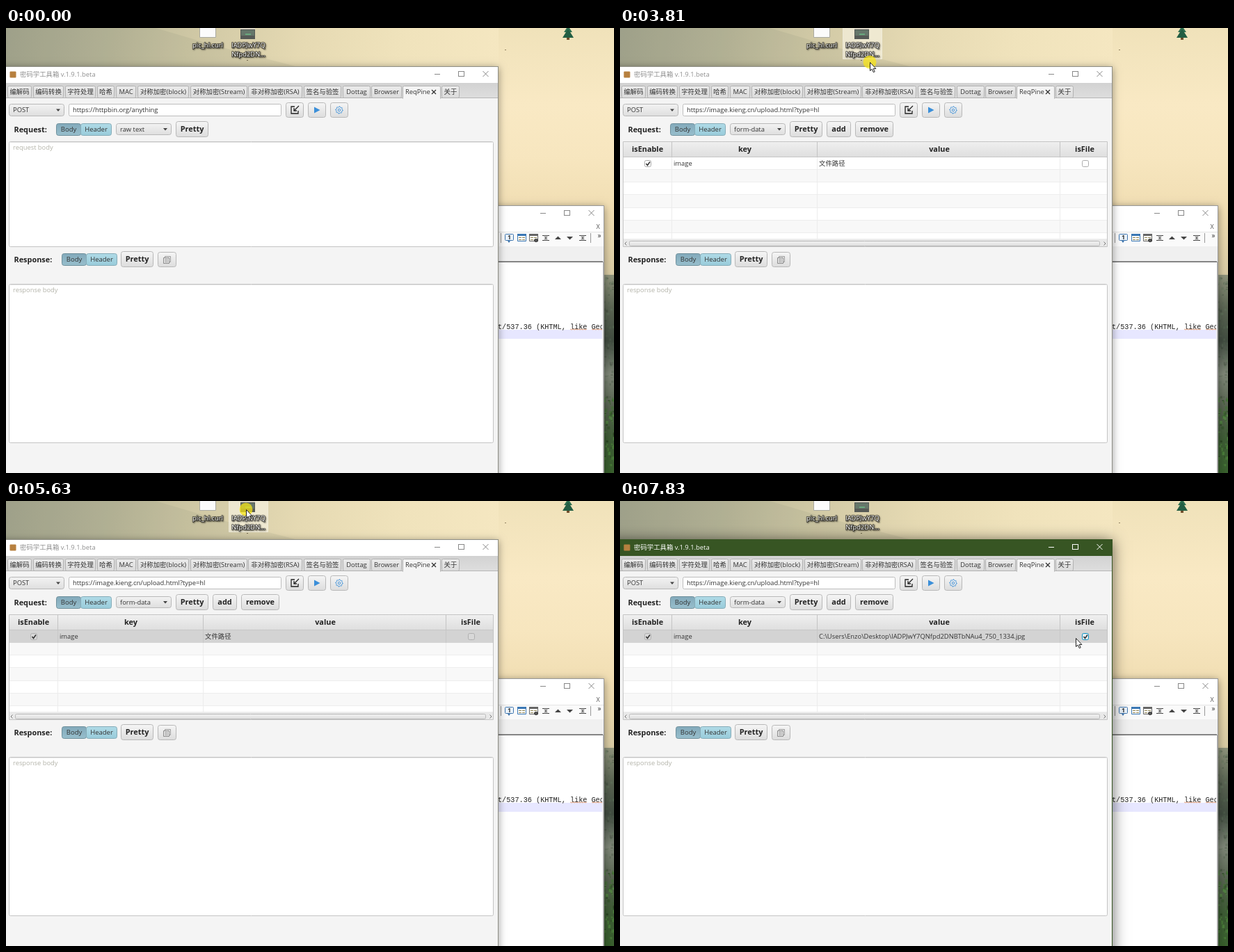
Animation of 874x640 px, one loop 8000 ms. Source, as an HTML page with a canvas:

```html
<!DOCTYPE html>
<html lang="zh">
<meta charset="utf-8">
<style>
html, body { margin: 0; width: 874px; height: 640px; overflow: hidden; }
canvas { display: block; }
</style>
<canvas id="stage" width="874" height="640"></canvas>
<script>
const ctx = document.getElementById('stage').getContext('2d');
const UI = '"Open Sans", "Noto Sans CJK SC", "Noto Sans CJK", sans-serif';
const MONO = '"Liberation Mono", monospace';
const LOOP = 8000;

// Cursor stops: time, x, y
const path = [
  [200, 521, 396], [1010, 300, 9], [1210, 283, 24], [1610, 232, 106], [1810, 225, 120],
  [2810, 225, 120], [3610, 355, 38], [3810, 359, 49], [4410, 342, 193], [4810, 341, 194],
  [5430, 345, 12], [5630, 345, 12], [6230, 340, 192], [6430, 340, 174],
  [7430, 673, 197], [7630, 673, 197], [7830, 655, 197]
];

// Drags: start, end, grab point on the icon
const drags = [
  { from: 1210, to: 1810, grab: [300, 9], icon: curlIcon },
  { from: 2210, to: 2810, grab: [300, 9], icon: curlIcon },
  { from: 4010, to: 4410, grab: [354, 38], icon: imageIcon },
  { from: 5830, to: 6230, grab: [345, 12], icon: imageIcon }
];
const presses = [1010, 3810, 4610, 5630, 7430];

const within = (t, a, b) => t >= a && t < b;

function tick(t) {
  const off = t < 1000 ? 0 : t < 5210 ? 10 : 30;
  return Math.floor((t - off) / 200) * 200 + off;
}

function cursorAt(t) {
  t = tick(t);
  const i = path.findIndex(p => p[0] > t);
  if (i < 0) return path.at(-1).slice(1);
  const [t0, x0, y0] = path[i - 1], [t1, x1, y1] = path[i];
  const k = (t - t0) / (t1 - t0), ease = k * k * (3 - 2 * k);
  return [Math.round(x0 + (x1 - x0) * ease), Math.round(y0 + (y1 - y0) * ease)];
}

function gradient(x1, y1, x2, y2, stops) {
  const g = ctx.createLinearGradient(x1, y1, x2, y2);
  stops.forEach(s => g.addColorStop(...s));
  return g;
}

const vgrad = (y, h, ...colors) =>
  gradient(0, y, 0, y + h, colors.map((c, i) => [i / (colors.length - 1), c]));

function rect(x, y, w, h, fill) {
  ctx.fillStyle = fill;
  ctx.fillRect(x, y, w, h);
}

function box(x, y, w, h, fill, stroke, r = 2, line = 1) {
  ctx.beginPath();
  ctx.roundRect(x + .5, y + .5, w - 1, h - 1, r);
  if (fill) { ctx.fillStyle = fill; ctx.fill(); }
  if (stroke) { ctx.strokeStyle = stroke; ctx.lineWidth = line; ctx.stroke(); }
}

function trace(points) {
  ctx.beginPath();
  for (let i = 0; i < points.length; i += 2) ctx.lineTo(points[i], points[i + 1]);
}

function poly(points, fill) {
  trace(points);
  ctx.fillStyle = fill;
  ctx.fill();
}

function stroke(points, color, width = 1) {
  trace(points);
  ctx.strokeStyle = color;
  ctx.lineWidth = width;
  ctx.stroke();
}

function text(s, x, y, color = '#333', size = 9.4, weight = 400, align = 'left', family = UI) {
  ctx.font = `${weight} ${size}px ${family}`;
  ctx.textAlign = align;
  ctx.fillStyle = color;
  ctx.fillText(s, x, y + size * .36);
}

const bold = (s, x, y, align = 'left') => text(s, x, y, '#222', 10.9, 700, align);

function button(x, y, w, h, label) {
  box(x, y, w, h, vgrad(y, h, '#f6f6f6', '#dcdcdc'), '#b8b8b8', 3);
  if (label) bold(label, x + w / 2, y + h / 2, 'center');
}

function combo(x, y, w, h, label) {
  box(x, y, w, h, vgrad(y, h, '#f3f3f3', '#dedede'), '#b8b8b8', 3);
  text(label, x + 6, y + h / 2);
  const cx = x + w - 9, cy = y + h / 2;
  poly([cx - 3, cy - 1.5, cx + 3, cy - 1.5, cx, cy + 2], '#444');
}

function toggles(x, y) {
  box(x, y, 36, 18, vgrad(y, 18, '#82a9ba', '#98bfcd'), '#6f909c', 3);
  box(x + 35, y, 45, 18, vgrad(y, 18, '#b0dbe7', '#98cbda'), '#86acb8', 3);
  text('Body', x + 18, y + 9, '#333', 9.5, 400, 'center');
  text('Header', x + 57.5, y + 9, '#333', 9.5, 400, 'center');
}

function area(y, h, hint) {
  box(4, y, 697, h, '#fff', '#c4c4c4', 2);
  stroke([5, y + 1.5, 700, y + 1.5], '#e6e6e6');
  text(hint, 10, y + 9, '#b4b4aa');
}

function caption(cx, y, color) {
  stroke([cx - 4, y + .5, cx + 4, y + .5], color);
  ctx.strokeRect(cx + 30.5, y - 3.5, 8, 7);
  const x = cx + 69.5;
  stroke([x - 4, y - 4, x + 4, y + 4], color);
  stroke([x + 4, y - 4, x - 4, y + 4], color);
}

function checkbox(x, y, on, fill, edge, mark = '#333') {
  box(x - 5, y - 5, 10, 10, fill, edge, 2);
  if (on) stroke([x - 2.5, y, x - .5, y + 2.5, x + 3, y - 2.5], mark, 1.6);
}

function desktop() {
  rect(0, 0, 874, 640, gradient(0, 0, 700, 120,
    [[0, '#a4a58e'], [.2, '#b7b598'], [.4, '#d2caa6'], [.6, '#e6dab3'], [.8, '#f0e3bc'], [1, '#f5e7c1']]));
  poly([0, 0, 215, 0, 300, 25, 420, 56, 0, 56], 'rgba(112,120,100,.1)');
  rect(708, 0, 166, 370, gradient(0, 0, 0, 370,
    [[0, '#f0e2ba'], [.3, '#f9e9c4'], [.5, '#f7e6bf'], [.7, '#f1deb3'], [.95, '#d9cba3'], [1, '#aeab8a']]));
  rect(858, 355, 16, 285, vgrad(355, 285, '#8e937b', '#5b6553', '#414c40', '#7f8778', '#56634f', '#3d5c34', '#39602e'));
  let seed = 7;
  const rnd = () => (seed = seed * 16807 % 2147483647) / 2147483647;
  for (let i = 0; i < 150; i++) {
    const y = 358 + rnd() * 280, lit = rnd();
    rect(858 + rnd() * 16, y, 1 + rnd() * 3, 1 + rnd() * 4,
      y > 530 ? `hsla(105,38%,${14 + lit * 30}%,.6)` : `hsla(110,12%,${20 + lit * 28}%,.35)`);
  }
  rect(717, 31, 2, 1, '#907f60');
  rect(346, 46, 2, 1, '#746a50');
  rect(806, 12, 4, 5, '#74502e');
  poly([808, -3, 814, 6, 802, 6], '#2f7050');
  poly([808, 1, 816, 14, 800, 14], '#235e43');
}

function label(s, x, y) {
  ctx.save();
  ctx.font = `9.4px ${UI}`;
  ctx.textAlign = 'center';
  ctx.lineJoin = 'round';
  ctx.lineWidth = 2;
  ctx.strokeStyle = 'rgba(0,0,0,.5)';
  ctx.shadowColor = '#000';
  ctx.shadowBlur = 2;
  ctx.shadowOffsetX = ctx.shadowOffsetY = 1;
  ctx.strokeText(s, x, y + 3.4);
  ctx.restore();
  text(s, x, y, '#fff', 9.4, 400, 'center');
}

function curlIcon() {
  box(278, -19, 24, 33, '#fbfbfb', '#a9a9a0', 0);
  poly([296, -19, 302, -13, 296, -13], '#c9c9c9');
  label('pic_hl.curl', 290, 24.5);
}

function imageIcon() {
  rect(337, -17, 21, 33, '#565a56');
  rect(337, -2, 21, 4, '#d6d0c0');
  rect(338, 3, 19, 8, '#65766a');
  rect(344, 8, 8, 2, '#69a87d');
  label('lADPJwY7Q', 348.5, 24.5);
  label('Nfpd2DN...', 348.5, 37.5);
}

function icons(t) {
  if (within(t, 1010, 3210)) box(262, -3, 57, 36, 'rgba(252,249,234,.68)', 'rgba(255,255,255,.6)', 0);
  const picked = within(t, 3610, 4610) || within(t, 5630, 7630);
  if (picked || within(t, 5230, 5630))
    box(320, -3, 57, 48, `rgba(252,249,234,${picked ? .6 : .3})`, 'rgba(255,255,255,.4)', 0);
  curlIcon();
  imageIcon();
}

function frameShadow(x, y, w, h, blur, alpha, fill) {
  ctx.save();
  ctx.shadowColor = `rgba(0,0,0,${alpha})`;
  ctx.shadowBlur = blur;
  ctx.shadowOffsetY = 2;
  rect(x, y, w, h, fill);
  ctx.restore();
}

function squiggle(x, w) {
  const p = [];
  for (let i = 0; i <= w; i += 2) p.push(x + i, 433 + (i % 4 ? 1 : 0));
  stroke(p, '#e08a5a', .8);
}

function editor() {
  frameShadow(600, 255, 260, 400, 11, .4, '#999');
  rect(600, 256, 259, 384, '#fff');
  caption(772, 266, '#888');
  text('X', 851, 286, '#555', 9, 400, 'center');
  rect(700, 293, 159, 1, '#e4e4e4');
  rect(700, 294, 159, 20, '#fafafa');
  rect(700, 314, 159, 22, '#f0f0f0');
  rect(700, 335, 158, 1, '#a0a0a0');
  rect(700, 336, 158, 1, '#696969');
  rect(858, 336, 1, 304, '#b4b4b4');
  rect(711, 295, 1, 14, '#999');
  rect(840, 295, 1, 14, '#999');
  box(717, 296, 13, 10, '#eaf3fc', '#3f75ad', 1);
  poly([721, 306, 725, 306, 723, 309], '#3f75ad');
  text('1', 723.5, 301, '#222', 8, 700, 'center');
  for (const [x, c] of [[735, '#3b78b5'], [752, '#666']]) {
    box(x, 296, 13, 11, '#fff', c, 0);
    rect(x, 296, 13, 3, c);
    for (const y of [301, 304]) { rect(x + 2, y, 4, 1, '#8d8250'); rect(x + 7, y, 4, 1, '#8d8250'); }
  }
  box(759, 303, 6, 5, '#555', '#333', 2);
  for (const x of [776, 829]) {
    rect(x - 5, 298, 10, 1, '#444');
    rect(x - 5, 305, 10, 1, '#444');
    poly([x - 3, 300, x + 3, 300, x, 302, x + 3, 304, x - 3, 304, x, 302], '#555');
  }
  poly([789, 304, 798, 304, 793.5, 299.5], '#444');
  poly([806, 300, 815, 300, 810.5, 304.5], '#444');
  text('»', 853, 298, '#333', 10, 400, 'center');
  rect(700, 434, 157, 13, '#e7e7ff');
  ctx.save();
  ctx.beginPath();
  ctx.rect(700, 336, 157, 304);
  ctx.clip();
  text('t/537.36 (KHTML, like Gecko)', 707, 429, '#222', 10.2, 400, 'left', MONO);
  squiggle(811, 24);
  squiggle(842, 18);
  ctx.restore();
}

function tabs() {
  rect(0, 79, 707, 22, vgrad(79, 22, '#d2d2d2', '#dedede'));
  rect(0, 100, 707, 1, '#b6b6b6');
  const list = [['编解码', 2, 37], ['编码转换', 39, 83], ['字符处理', 85, 129], ['哈希', 131, 156],
    ['MAC', 158, 187], ['对称加密(block)', 189, 263], ['对称加密(Stream)', 265, 347],
    ['非对称加密(RSA)', 348, 426], ['签名与验签', 428, 482], ['Dottag', 484, 524],
    ['Browser', 525, 569], ['ReqPine', 570, 625], ['关于', 626, 652]];
  for (const [name, a, b] of list) {
    const open = name === 'ReqPine';
    box(a, 83, b - a, open ? 20 : 18, open ? '#f4f4f4' : vgrad(83, 18, '#ececec', '#dadada'), '#b2b2b2', 2);
    if (open) rect(a + 1, 100, b - a - 2, 4, '#f4f4f4');
    text(name, open ? a + 4 : (a + b) / 2, 92, '#333', 9.4, 400, open ? 'left' : 'center');
  }
  stroke([612, 89, 618, 95], '#333', 1.3);
  stroke([618, 89, 612, 95], '#333', 1.3);
}

function toolbar(t) {
  combo(4, 109, 80, 18, 'POST');
  box(90, 109, 306, 18, '#fff', '#bdbdbd', 2);
  text(t < 1810 ? 'https://httpbin.org/anything' : 'https://image.kieng.cn/upload.html?type=hl', 96, 118);
  for (const x of [402, 434, 466]) button(x, 107, 26, 22);
  stroke([415, 113, 410, 113, 410, 123, 420, 123, 420, 119], '#222', 1.3);
  stroke([421, 112, 414, 119], '#222', 1.3);
  stroke([414, 115, 414, 119, 418, 119], '#222', 1.3);
  poly([443, 113.5, 451.5, 118, 443, 122.5], '#3b8fd9');
  const ring = [];
  for (let i = 0; i <= 32; i++) {
    const a = i / 16 * Math.PI, r = i % 4 < 2 ? 5.2 : 4.1;
    ring.push(479 + r * Math.cos(a), 118 + r * Math.sin(a));
  }
  stroke(ring, '#4a98dc', 1);
  ctx.beginPath();
  ctx.arc(479, 118, 1.7, 0, 7);
  ctx.stroke();

  bold('Request:', 11.5, 146);
  toggles(72, 137);
  combo(158, 137, 80, 17, t < 1810 ? 'raw text' : 'form-data');
  button(244, 134, 47, 23, 'Pretty');
  if (t >= 1810) {
    button(297, 134, 35, 23, 'add');
    button(338, 134, 55, 23, 'remove');
  }
  bold('Response:', 11.5, 333);
  toggles(80, 324);
  button(165, 321, 47, 23, 'Pretty');
  button(218, 322, 27, 22);
  box(228, 328, 9, 9, '#eee', '#999', 0);
  box(226, 330, 9, 9, '#eee', '#888', 0);
  for (const y of [332, 334, 336]) rect(228, y, 5, 1, '#999');
}

function table(t) {
  const rows = [186, 204, 222, 240, 259, 277, 295, 304];
  const focus = within(t, 4610, 5630);
  const grey = t >= 5630;
  rect(4, 163, 697, 152, '#fff');
  rect(4, 163, 697, 23, vgrad(163, 23, '#f0f0f0', '#dedede'));
  for (let i = 0; i < 7; i++) {
    if (i % 2) rect(5, rows[i], 695, rows[i + 1] - rows[i], '#f8f8f8');
    rect(5, rows[i + 1] - 1, 695, 1, '#ededed');
  }
  if (focus || grey) rect(5, 186, 695, 18, focus ? '#0096c9' : '#d3d3d3');
  rect(4, 185, 697, 1, '#c6c6c6');
  for (const x of [74, 283, 632]) {
    rect(x, 164, 1, 22, '#c4c4c4');
    rect(x, 186, 1, 118, '#ececec');
    if (focus || grey) rect(x, 186, 1, 18, focus ? '#0e87b4' : '#c8c8c8');
  }
  bold('isEnable', 39.5, 174.5, 'center');
  bold('key', 179.5, 174.5, 'center');
  bold('value', 459, 174.5, 'center');
  bold('isFile', 668, 174.5, 'center');
  const ink = focus ? '#fff' : '#333';
  const fill = focus ? '#0b9fd1' : grey ? '#d8d8d8' : '#fff';
  const edge = focus ? '#1c86ad' : grey ? '#b0b0b0' : '#aaa';
  checkbox(40, 195, true, fill, focus ? '#3aaed6' : edge, ink);
  const ticked = t >= 7630;
  checkbox(669, 195, ticked, ticked ? '#e4eef2' : fill, ticked ? '#0a93c4' : edge);
  text('image', 77, 195, ink);
  text(t < 6230 ? '文件路径' : 'C:\\Users\\Enzo\\Desktop\\lADPJwY7QNfpd2DNBTbNAu4_750_1334.jpg', 286, 195, ink);
  rect(5, 304, 695, 11, '#e9e9e9');
  box(13, 306, 677, 8, vgrad(306, 8, '#f4f4f4', '#dcdcdc'), '#b9b9b9', 2);
  stroke([9.5, 307.5, 7, 310, 9.5, 312.5], '#777');
  stroke([695.5, 307.5, 698, 310, 695.5, 312.5], '#777');
  box(4, 163, 697, 152, null, focus ? '#18a3d6' : '#c4c4c4', 0, focus ? 2 : 1);
}

function toolbox(t) {
  const active = within(t, 4610, 5630) || t >= 7430;
  frameShadow(-20, 55, 728, 620, active ? 20 : 11, active ? .6 : .4, active ? '#375523' : '#8f8f86');
  rect(0, 56, 707, 23, active ? '#375523' : '#fff');
  rect(0, 79, 707, 561, '#f4f4f4');
  box(5, 62, 10, 10, '#b7803f', null, 1);
  text('密码学工具箱 v.1.9.1.beta', 20, 67, active ? '#fff' : '#8f8f8f');
  caption(620, 66, active ? '#fff' : '#888');
  tabs();
  toolbar(t);
  if (t < 1810) area(163, 152, 'request body');
  else table(t);
  area(368, 229, 'response body');
}

function ghost({ grab, icon }, x, y) {
  ctx.save();
  ctx.globalAlpha = .6;
  ctx.translate(x - grab[0], y - grab[1]);
  icon();
  ctx.restore();
}

function moveTip(x, y) {
  box(x + 9, y + 9, 50, 15, '#fff', '#66667a', 0);
  stroke([x + 12, y + 16.5, x + 20, y + 16.5], '#2440b8', 1.2);
  stroke([x + 17, y + 13.5, x + 20, y + 16.5, x + 17, y + 19.5], '#2440b8', 1.2);
  text('移动到', x + 24, y + 16.5, '#1a2fb0');
}

function pointer(t) {
  if (t < 200) return;
  const [x, y] = cursorAt(t);
  const drag = drags.find(d => within(t, d.from, d.to));
  if (drag) ghost(drag, x, y);
  if (drag || presses.some(p => within(t, p, p + 200))) {
    ctx.beginPath();
    ctx.arc(x, y, 9.5, 0, 7);
    ctx.fillStyle = 'rgba(250,230,20,.72)';
    ctx.fill();
  }
  if (drag) moveTip(x, y);
  const arrow = [0, 0, 0, 12, 2.7, 9.6, 4.8, 14.2, 6.7, 13.3, 4.7, 9, 8.4, 9, 0, 0]
    .map((v, i) => v + (i % 2 ? y : x) + .5);
  poly(arrow, '#fff');
  stroke(arrow, '#222');
}

function draw(now) {
  const t = now % LOOP;
  desktop();
  icons(t);
  editor();
  toolbox(t);
  pointer(t);
  requestAnimationFrame(draw);
}

requestAnimationFrame(draw);
</script>
</html>
```
